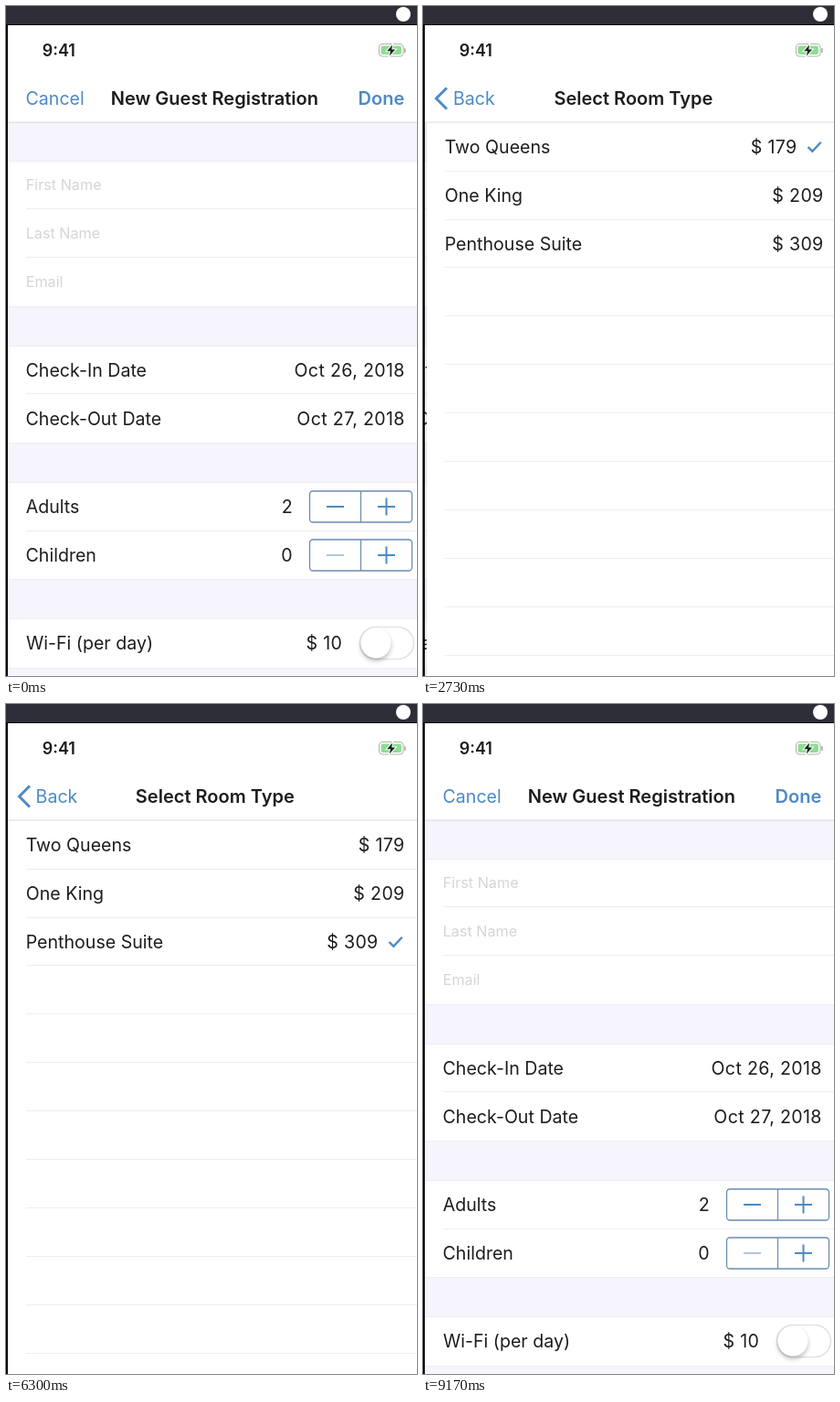
Write an HTML page with a canvas that moves like this. It is 450 px wide and 732 px high and loops after 9.38 s.

```html
<!DOCTYPE html>
<html lang="en">
<head>
<meta charset="utf-8">
<title>Guest registration</title>
<style>
html, body { margin: 0; width: 450px; height: 732px; overflow: hidden; background: #fff; }
canvas { display: block; }
</style>
</head>
<body>
<canvas id="stage" width="450" height="732"></canvas>
<script>
const ctx = document.getElementById('stage').getContext('2d');
const W = 450, H = 732, LEFT = 2, VIEW_W = 448, CONTENT_TOP = 127;
const LOOP = 9380, STEP = 70;
const PUSH = 2262, BACK_TAP = 7000, POP = 7100;
const PICK_KING = 4130, PICK_SUITE = 5180;

const INK = '#1d1d20', BLUE = '#4c8ac6', PALE_BLUE = '#b4c6df', OUTLINE = '#688bb3';
const GROUP = '#f6f4fd', HAIRLINE = '#eeeef1', FAINT = '#d5d5d9';
const BODY = '400 19.6px', BOLD = '600 20.02px', SMALL = '400 16.2px';
const NUMERIC = { align: 'right', spacing: '0.35px' };

function text(str, x, y, { font = BODY, color = INK, align = 'left', alpha = 1, spacing = '0px' } = {}) {
  ctx.save();
  ctx.globalAlpha *= alpha;
  ctx.font = font + ' Inter, Roboto, sans-serif';
  ctx.letterSpacing = spacing;
  ctx.fillStyle = color;
  ctx.textAlign = align;
  ctx.fillText(str, x, y);
  ctx.restore();
}

function rect(x, y, w, h, color) {
  ctx.fillStyle = color;
  ctx.fillRect(x, y, w, h);
}

function path(points, color, width) {
  ctx.beginPath();
  points.forEach(([x, y]) => ctx.lineTo(x, y));
  ctx.strokeStyle = color;
  ctx.lineWidth = width;
  ctx.stroke();
}

function roundBox(x, y, w, h, r, fill, stroke, width = 1) {
  ctx.beginPath();
  ctx.roundRect(x, y, w, h, r);
  if (fill) {
    ctx.fillStyle = fill;
    ctx.fill();
  }
  if (stroke) {
    ctx.strokeStyle = stroke;
    ctx.lineWidth = width;
    ctx.stroke();
  }
}

function disc(x, y, r, color) {
  ctx.beginPath();
  ctx.arc(x, y, r, 0, Math.PI * 2);
  ctx.fillStyle = color;
  ctx.fill();
}

// Share of the distance still left, for a critically damped spring
function springLeft(ms) {
  const s = Math.max(0, ms) * 0.0168;
  return (1 + s) * Math.exp(-s);
}

function stepper(y, value, minusColor) {
  text(value, 314, y + 7, NUMERIC);
  roundBox(332.5, y - 17, 112, 34, 3.5, null, OUTLINE, 1.3);
  path([[388.5, y - 17], [388.5, y + 17]], OUTLINE, 1.2);
  path([[351, y], [370, y]], minusColor, 2);
  path([[407, y], [426, y]], BLUE, 2);
  path([[416.5, y - 9.5], [416.5, y + 9.5]], BLUE, 2);
}

function toggle(y) {
  roundBox(387.5, y - 17.5, 59, 35, 17.5, '#fff', '#e3e3e6', 1.6);
  ctx.save();
  ctx.shadowColor = 'rgba(0,0,0,.25)';
  ctx.shadowBlur = 5;
  ctx.shadowOffsetY = 3;
  disc(405, y, 16.5, '#fff');
  ctx.restore();
}

function formView() {
  const width = VIEW_W + 20;
  rect(LEFT, CONTENT_TOP, width, H, '#fff');
  [[127, 42], [328, 43], [477, 43], [626, 43], [723, 20]].forEach(([y, h]) => {
    rect(LEFT, y, width, h, GROUP);
    rect(LEFT, y, width, 1, '#eeecf3');
    rect(LEFT, y + h, width, 1, '#eeecf3');
  });
  [221, 274, 423, 573].forEach(y => rect(22, y, width, 1, HAIRLINE));
  ['First Name', 'Last Name', 'Email'].forEach((label, i) =>
    text(label, 21.7, 201 + i * 53, { font: SMALL, color: FAINT }));
  [['Check-In Date', 'Oct 26, 2018'], ['Check-Out Date', 'Oct 27, 2018']].forEach(([label, date], i) => {
    text(label, 21.5, 405 + i * 53);
    text(date, 436.8, 405 + i * 53, NUMERIC);
  });
  text('Adults', 21.7, 554);
  stepper(547, '2', BLUE);
  text('Children', 21.5, 607);
  stepper(600, '0', PALE_BLUE);
  text('Wi-Fi (per day)', 21.9, 703);
  text('$ 10', 368.3, 703, NUMERIC);
  toggle(696);
}

function roomView(selected) {
  rect(LEFT, CONTENT_TOP, VIEW_W, H, '#fff');
  for (let i = 0; i < 11; i++) rect(22, Math.round(179.6 + i * 52.9), 428, 1, HAIRLINE);
  [['Two Queens', '$ 179'], ['One King', '$ 209'], ['Penthouse Suite', '$ 309']].forEach(([name, price], i) => {
    const y = 154 + i * 53, checked = i === selected;
    text(name, 21.7, y + 7);
    text(price, checked ? 407.6 : 436.6, y + 7, NUMERIC);
    if (checked) path([[419.5, y], [424.3, y + 4.7], [433.7, y - 5.3]], BLUE, 2.4);
  });
}

function statusBar() {
  rect(0, 0, W, 20, '#2d2e38');
  rect(0, 20, W, 1, '#08080c');
  rect(0, 20, LEFT, H, '#08080c');
  disc(435, 9, 8, '#fff');
  text('9:41', 39.7, 55, { font: '600 18px' });

  roundBox(408.5, 41.5, 26.5, 13.5, 4, '#fff', '#b0b1b0', 1.1);
  roundBox(410.5, 43.5, 22.5, 9.5, 2.3, '#8fdc92');
  roundBox(436, 46, 1.7, 5, 1, '#b0b1b0');
  ctx.beginPath();
  [[423, 42.5], [417.2, 49.2], [421, 49.2], [419.8, 54.5], [426.2, 47.5], [422.3, 47.5]]
    .forEach(([x, y]) => ctx.lineTo(x, y));
  ctx.closePath();
  ctx.strokeStyle = '#fff';
  ctx.lineWidth = 2;
  ctx.stroke();
  ctx.fillStyle = '#17231a';
  ctx.fill();
}

// n runs from 0 (form) to 1 (room list)
function navBar(n, pressed) {
  const out = 1 - n, y = 107.5, backAlpha = n * (pressed ? 0.3 : 1);
  rect(LEFT, 21, VIEW_W, CONTENT_TOP - 21, '#fff');
  rect(LEFT, 126.5, VIEW_W, 1, '#dcdce1');
  text('Cancel', 21.5, y, { color: BLUE, alpha: out });
  text('Done', 436.3, y, { font: BOLD, color: BLUE, align: 'right', alpha: out });
  text('New Guest Registration', 114.8 - 82 * n, y, { font: BOLD, alpha: out });
  text('Select Room Type', 141.8 + 308 * out, y, { font: BOLD, alpha: n });
  text('Back', 32.6 + 82 * out, y, { color: BLUE, alpha: backAlpha });
  ctx.save();
  ctx.globalAlpha = backAlpha;
  path([[26, 89.5], [14.5, 101], [26, 112.5]], BLUE, 3);
  ctx.restore();
}

// Both results run from 0 (form) to 1 (room list)
function progress(t) {
  if (t < PUSH) return { slide: 0, nav: 0 };
  if (t < POP) {
    const left = springLeft(t - PUSH);
    return { slide: 1 - left, nav: 1 - Math.pow(left, 0.927) };
  }
  const left = springLeft(t - POP);
  return { slide: left, nav: Math.pow(left, 1.3) };
}

function draw(t) {
  const { slide, nav } = progress(t);
  const selected = t < PICK_KING ? 0 : t < PICK_SUITE ? 1 : 2;

  rect(0, 0, W, H, '#fff');
  ctx.save();
  ctx.beginPath();
  ctx.rect(LEFT, CONTENT_TOP, VIEW_W, H);
  ctx.clip();

  ctx.save();
  ctx.translate(-0.3 * VIEW_W * slide, 0);
  formView();
  ctx.restore();

  if (slide > 0.015) {
    rect(0, CONTENT_TOP, W, H, `rgba(35,10,10,${0.062 * slide})`);
    ctx.translate(Math.round(VIEW_W * (1 - slide)), 0);
    const shade = ctx.createLinearGradient(LEFT - 7, 0, LEFT, 0);
    shade.addColorStop(0, 'rgba(0,0,0,0)');
    shade.addColorStop(1, `rgba(0,0,0,${0.03 * slide})`);
    rect(LEFT - 7, CONTENT_TOP, 7, H, shade);
    roomView(selected);
  }
  ctx.restore();

  navBar(nav, t >= BACK_TAP);
  statusBar();
}

function frame(now) {
  draw(Math.floor((now % LOOP) / STEP) * STEP);
  requestAnimationFrame(frame);
}
draw(0);
requestAnimationFrame(frame);
</script>
</body>
</html>
```
